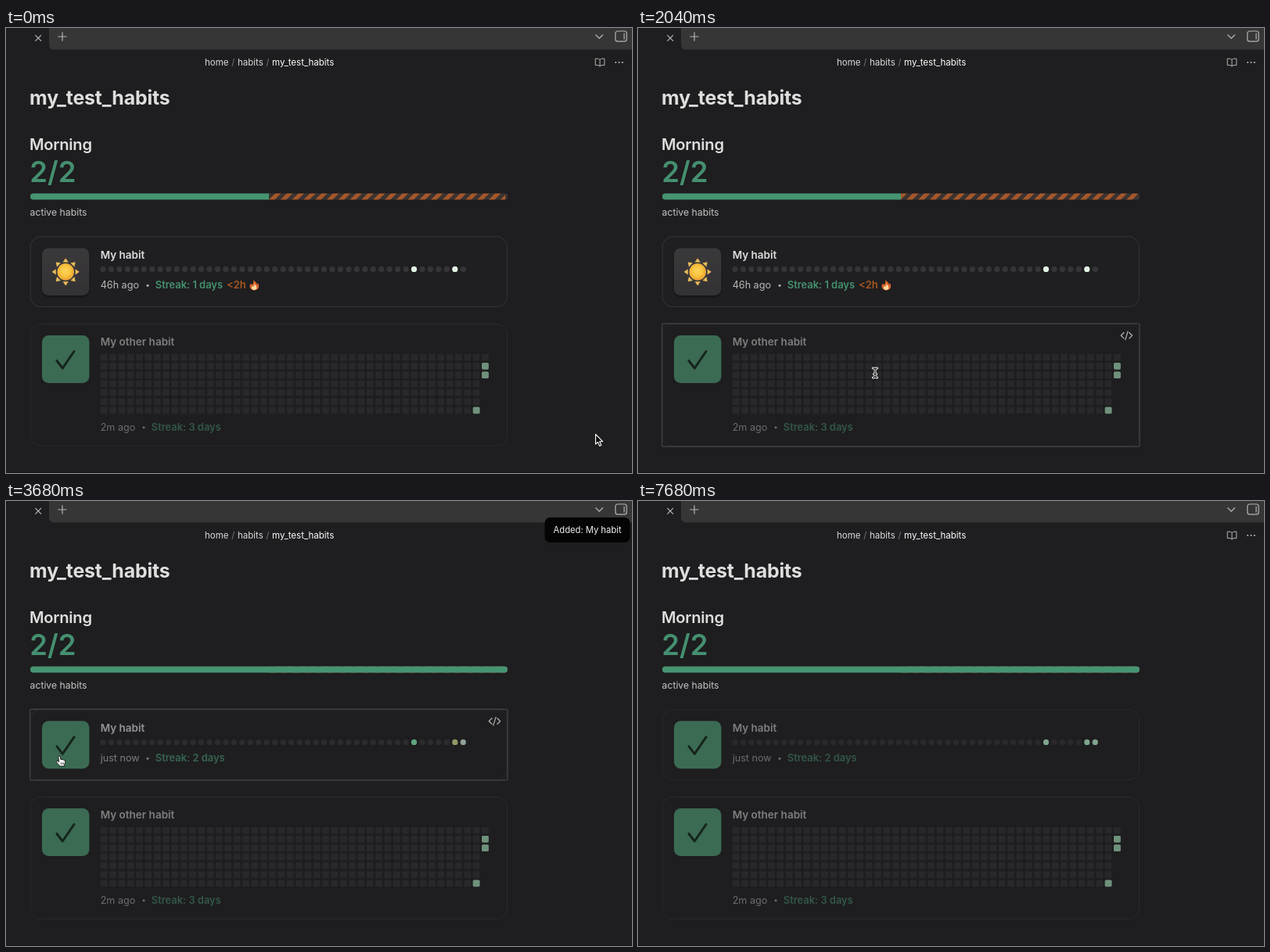
Animation of 800 by 569 pixels, one loop 7.96 s. Source, as an HTML page:

```html
<!DOCTYPE html>
<html lang="en">
<head>
<meta charset="utf-8">
<title>Habits</title>
<style>
html, body { margin: 0; width: 100%; height: 100%; overflow: hidden; background: #1e1d1f; }
svg { display: block; width: 800px; height: 569px; font-family: Inter, Roboto, sans-serif; }
.line { fill: none; stroke: #b4b4b4; stroke-width: 1.2; stroke-linecap: round; stroke-linejoin: round; }
.crumb { font-size: 11.5px; fill: #dadada; }
.name { font-size: 13.5px; font-weight: 600; fill: #dedede; }
.meta { font-size: 12.6px; fill: #b9b9ba; }
.streak { font-size: 12.9px; font-weight: 600; fill: #459270; }
.card { fill: #1f1e20; stroke: #363537; }
.frame { fill: none; stroke: #3f3e40; stroke-width: 1.5; }
</style>
</head>
<body>
<svg id="stage" viewBox="0 0 800 569"></svg>
<script>
const LOOP = 7960, CLICK = 3400;
const FULL = 610, HALF = 305, PITCH = 14.79, DRIFT = 4000;

const text = (x, y, cls, s) => `<text x="${x}" y="${y}" class="${cls}">${s}</text>`;
const line = (d, extra = '') => `<path class="line" d="${d}" ${extra}/>`;
const repeat = (n, fn) => Array.from({ length: n }, (_, i) => fn(i)).join('');

const check = y => `
  <rect x="46" y="${y}" width="60.5" height="61" rx="8.5" fill="#3b6b53"/>
  <path d="M65 ${y + 32.5}L72.3 ${y + 42}L87 ${y + 20.5}" fill="none" stroke="#16241d"
    stroke-width="3" stroke-linecap="round" stroke-linejoin="round"/>`;

const info = (y, when, bullet, streak) =>
  text(120.7, y, 'meta', when) +
  `<circle cx="${bullet}" cy="${y - 4}" r="1.5" fill="#b9b9ba"/>` +
  text(bullet + 9.8, y, 'streak', streak);

const hover = (id, y, h) => `<g id="${id}">
  <rect class="frame" x="30.7" y="${y}" width="610.3" height="${h}" rx="2"/>
  ${line(`M621 ${y + 11.5}l-3.8 3.7l3.8 3.7M627.8 ${y + 11.5}l3.8 3.7l-3.8 3.7M626 ${y + 10}l-3.2 10.6`)}</g>`;

const dotX = i => 124 + i * 10.46;
const MARKS = [38, 43, 44];
const dots = repeat(45, i => MARKS.includes(i) ? '' :
  `<circle cx="${dotX(i)}" cy="308.4" r="3.6" fill="#353437"/>`);
const marks = MARKS.map(i => `<circle id="mark${i}" cx="${dotX(i)}" cy="308.4" r="3.6"/>`).join('');

const grid = repeat(44, c => repeat(c === 43 ? 3 : 7, r => {
  const done = c === 43 ? r > 0 : c === 42 && r === 6;
  return `<rect x="${120.8 + c * 11.33}" y="${416.7 + r * 11.3}" width="8.9" height="8.7" rx="1.6"
    fill="${done ? '#6f917c' : '#282729'}"/>`;
}));

const rays = repeat(8, i => `<path d="M-3.6 -12.4L0 -17.6L3.6 -12.4Z" transform="rotate(${i * 45})"/>`);

document.getElementById('stage').innerHTML = `
<defs>
  <pattern id="stripes" width="${PITCH}" height="20" patternUnits="userSpaceOnUse">
    <rect width="${PITCH}" height="20" fill="#3a3331"/>
    <rect width="${PITCH / 2}" height="20" fill="#a6572a"/>
  </pattern>
  <clipPath id="bar"><rect x="31" y="211.4" width="${FULL}" height="8.2" rx="4.1"/></clipPath>
  <radialGradient id="sun" cx=".48" cy=".45"><stop offset="0" stop-color="#fdd35c"/>
    <stop offset=".65" stop-color="#f8c23e"/><stop offset="1" stop-color="#e9a535"/></radialGradient>
  <linearGradient id="tile" x2="0" y2="1"><stop stop-color="#3a393b"/><stop offset="1" stop-color="#333234"/></linearGradient>
  <filter id="shade" x="-20%" y="-20%" width="140%" height="150%">
    <feDropShadow dx="0" dy="1.5" stdDeviation="1.5" flood-opacity=".5"/></filter>
</defs>
<rect width="800" height="569" fill="#1e1d1f"/>
<rect y="568" width="800" height="1" fill="#161517"/>

<path d="M55 0H800V27.5H61Q55 27.5 55 21Z" fill="#363637"/>
${line('M37.7 9.3l7 7m0-7l-7 7')}
${line('M66.8 11h10.4m-5.2-5.2v10.4')}
${line('M753.7 8.8l4.5 4.4l4.5-4.4')}
<rect class="line" x="778.8" y="4" width="14.4" height="13.2" rx="3"/>
${line('M790 7v7.2', 'stroke-width="1.6"')}

${text(254, 48, 'crumb', 'home')}
<text x="288.3" y="48" class="crumb" style="fill:#777">/</text>
${text(296, 48, 'crumb', 'habits')}
<text x="332.3" y="48" class="crumb" style="fill:#777">/</text>
<text x="340" y="48" class="crumb" style="fill:#fff">my_test_habits</text>
${line('M759 40.5Q757.8 39.2 755.8 39.2H753.2V47.6H756Q758.2 47.6 759 49Q759.8 47.6 762 47.6H764.8V39.2H762.2Q760.2 39.2 759 40.5V49', 'style="stroke-width:1"')}
${repeat(3, i => `<circle cx="${779.2 + i * 4.3}" cy="44" r="1.1" fill="#b4b4b4"/>`)}

<text x="30" y="98.3" font-size="24.9" font-weight="700" letter-spacing="-.16" fill="#dedede">my_test_habits</text>
<text x="30" y="156.4" font-size="20.2" font-weight="600" letter-spacing="-.28" fill="#dedede">Morning</text>
<text x="30.2" y="197.4" font-size="36.6" font-weight="600" fill="#449070">2/2</text>
<g clip-path="url(#bar)">
  <rect x="${31 + HALF}" y="211" width="${HALF}" height="9" fill="url(#stripes)"/>
  <rect x="638" y="211" width="4" height="9" fill="#3a3331"/>
  <rect id="fill" x="30" y="210" height="11" fill="#469472"/>
</g>
<text x="30.5" y="240.3" font-size="12.25" fill="#c4c4c5">active habits</text>

<g id="first">
  <rect class="card" x="31.2" y="266.7" width="609.3" height="89.8" rx="13"/>
  ${text(120.7, 294.6, 'name', 'My habit')}
  ${dots}
  <g id="before">
    ${info(333.3, '46h ago', 181, 'Streak: 1 days')}
    <text x="282" y="333.3" class="streak" style="fill:#a9591f">&lt;2h</text>
    <path d="M316 322.3Q320 325 321 328Q322 327 321.8 325.8Q324 330 322.4 333Q320.8 335.4 317 335.4Q312.6 335.2 311.6 331.6Q311 328.6 313 326.4Q313.4 328 314.4 328.4Q317 326 316 322.3Z" fill="#d9652f"/>
    <path d="M317.3 327Q321 330.6 320.2 333.2Q319.2 335 317 335Q314.2 334.8 314 332.4Q314 330.6 315.2 329.6Q316 331 316.6 330.6Q317.6 329.4 317.3 327Z" fill="#f8dca0"/>
  </g>
  <g id="after">${info(333.3, 'just now', 181, 'Streak: 2 days')}</g>
</g>
${marks}
<g id="sunny">
  <rect x="46" y="281.5" width="60.3" height="60.5" rx="8.5" fill="url(#tile)" filter="url(#shade)"/>
  <g transform="translate(76.2 311.8)" fill="#e8bb5c">${rays}<circle r="10.8" fill="url(#sun)"/></g>
</g>
<g id="checked">${check(281.3)}</g>

<g opacity=".5">
  <rect class="card" x="31.2" y="378.5" width="609.3" height="155.8" rx="13"/>
  ${text(120.7, 406.3, 'name', 'My other habit')}
  ${info(514.8, '2m ago', 176, 'Streak: 3 days')}
</g>
${grid}
${check(393)}
${hover('hover1', 266.3, 90.7)}
${hover('hover2', 378, 157.2)}
<path id="caret" d="M31.3 537.3V553.8" stroke="#e6e6e6" stroke-width="1.2"/>

<g id="toast">
  <rect x="688.5" y="21" width="109" height="32" rx="7" fill="#040404"/>
  <text x="699.6" y="41.2" font-size="11.2" fill="#f2f2f2">Added: My habit</text>
</g>

<g id="arrow"><path d="M0 0V12.6L2.9 10L5 14.9L7.2 14L5.1 9.2H9Z" fill="#111" stroke="#fff" stroke-width="1.1" stroke-linejoin="round"/></g>
<g id="beam" fill="none" stroke-linecap="round">
  ${['stroke="#f4f4f4" stroke-width="3"', 'stroke="#111" stroke-width="1.1"'].map(s =>
    `<path d="M-2.6 -6Q0 -6 0 -4.3Q0 -6 2.6 -6M0 -4.3V4.3M-2.6 6Q0 6 0 4.3Q0 6 2.6 6M-1.6 1.5H1.6" ${s}/>`).join('')}
</g>
<g id="hand">
  <path d="M-1.2 .8Q0 -.8 1.2 .8L1.9 4.6Q3 3.6 4 4.8Q5.2 4.2 6 5.4Q7.6 5.2 7.8 7Q7.9 9.5 6.6 11.2V13H.6Q-.2 11.2 -2.4 9.2Q-4.2 7 -3.2 6.4Q-1.8 6 -.2 7.8Z" fill="#fff" stroke="#111" stroke-width=".9" stroke-linejoin="round"/>
  <path d="M2.2 8.3V11M4 8.3V11M5.7 8.3V11" stroke="#222" stroke-width=".7"/>
</g>`;

const el = id => document.getElementById(id);
const show = (id, on) => el(id).setAttribute('visibility', on ? 'visible' : 'hidden');
const clamp = v => Math.min(1, Math.max(0, v));
const ease = v => v * v * (3 - 2 * v);
const ramp = (t, from, to) => ease(clamp((t - from) / (to - from)));

// time, x, y of the pointer's hot spot
const PATH = [
  [0, 753.5, 519.5], [1320, 753.5, 519.5], [1480, 700, 506], [1640, 610, 490],
  [1840, 430, 463], [2040, 303, 441], [2280, 180, 395], [2480, 95, 345],
  [2640, 68, 331], [3000, 68, 331], [3240, 68, 326], [4240, 68, 326],
  [4600, 38, 360], [4800, 10, 385], [5040, -16, 392]
];

function pointer(t) {
  const i = PATH.findIndex(p => p[0] > t);
  if (i < 0) return PATH[PATH.length - 1].slice(1);
  const a = PATH[i - 1], b = PATH[i], k = (t - a[0]) / (b[0] - a[0]);
  return [a[1] + (b[1] - a[1]) * k, a[2] + (b[2] - a[2]) * k];
}

function markColours(t) {
  if (t < CLICK) return ['#e2f3e5', '#e2f3e5', '#353437'];
  if (t < 4400) return ['#5fa57d', '#8f9c62', '#8fa198'];
  if (t < 7600) return ['#6ba283', '#5f9c7c', '#839088'];
  return ['#7fa58d', '#7fa58d', '#7fa58d'];
}

function draw(t) {
  const done = t >= CLICK;
  el('stripes').setAttribute('patternTransform',
    `translate(${31 + HALF - t / DRIFT * PITCH} 219.5) skewX(-45)`);
  el('fill').setAttribute('width', 1 + HALF + (FULL - HALF + 1) * ramp(t, CLICK, 3640));

  show('before', !done);
  show('after', done);
  show('sunny', !done);
  show('checked', done);
  el('first').setAttribute('opacity', 1 - .38 * ramp(t, CLICK, 3680) - .12 * ramp(t, 3720, 4360));
  markColours(t).forEach((c, i) => el('mark' + MARKS[i]).setAttribute('fill', c));

  show('caret', !done && t % 1000 >= 500);

  const enter = ramp(t, CLICK, 3560);
  el('toast').setAttribute('opacity', enter * (1 - clamp((t - 7520) / 160)));
  el('toast').setAttribute('transform', `translate(${(1 - enter) * 12} 0)`);

  const [x, y] = pointer(t);
  const inside = x > 31 && x < 641;
  const onFirst = inside && y > 266 && y < 357;
  const onSecond = inside && y > 378 && y < 535;
  const onTile = x > 46 && x < 106 && y > 281 && y < 342;
  const kind = onTile ? 'hand' : inside ? 'beam' : 'arrow';
  show('hover1', onFirst);
  show('hover2', onSecond);
  for (const id of ['arrow', 'beam', 'hand']) show(id, id === kind);
  el(kind).setAttribute('transform', `translate(${x} ${y})`);
}

const start = performance.now();
function tick() {
  const t = (performance.now() - start) % LOOP;
  draw(t - t % 40);
  requestAnimationFrame(tick);
}
draw(0);
requestAnimationFrame(tick);
</script>
</body>
</html>
```
